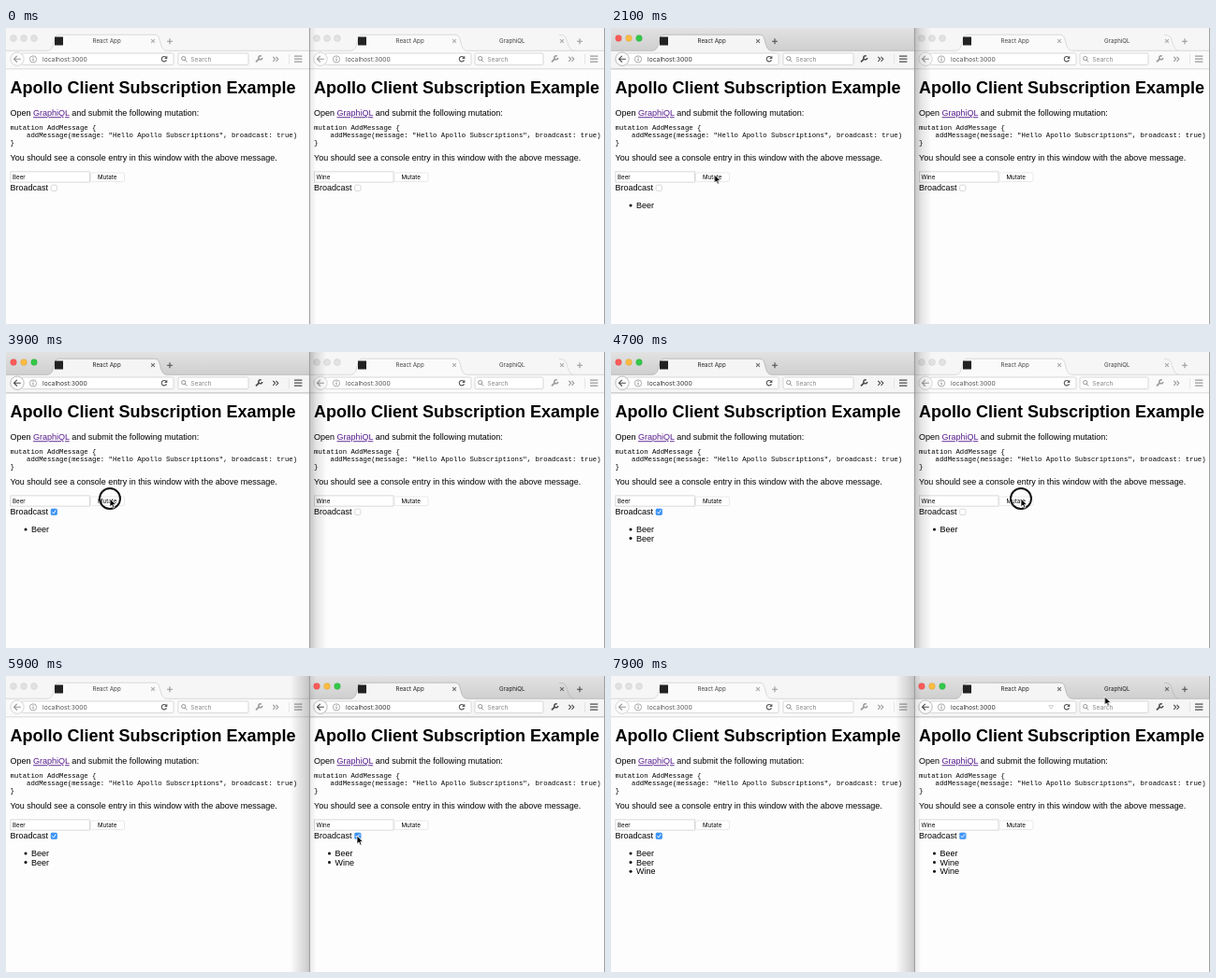
Write an HTML page that moves like this. It is 640 px wide and 317 px high and loops after 8000 ms.

```html
<!DOCTYPE html>
<html lang="en">
<head>
<meta charset="utf-8">
<title>Subscription demo</title>
<style>
  html, body { margin: 0; width: 100%; height: 100%; overflow: hidden; background: #fdfdfd; }
  svg { display: block; width: 100vw; height: 100vh; }
  text { font-family: "Liberation Sans", Arial, sans-serif; font-size: 9px; fill: #000; }
  .h1 { font-size: 18px; font-weight: bold; }
  .code { font-family: "Liberation Mono", "Courier New", monospace; font-size: 7.3125px; }
  .ui { font-family: Inter, sans-serif; font-size: 6.19px; }
  .url { font-family: Inter, sans-serif; font-size: 6.75px; fill: var(--text); }
  .hint { fill: #888; }
  .link { fill: #551a8b; text-decoration: underline; }
  .idle { --strip: #f6f6f6; --bar: #fafafa; --edge: #d2d2d2; --icon: #999; --text: #555; --title: #444; --red: #e2e2e2; --amber: #e2e2e2; --green: #e2e2e2; --ring: #d0d0d0; }
  .live { --strip: url(#strip); --bar: #f5f5f5; --edge: #b4b4b4; --icon: #4c4c4c; --text: #333; --title: #222; --red: #fc5b57; --amber: #fdbc40; --green: #34c84a; --ring: #0002; }
  .tab { fill: var(--title); }
  .line { fill: none; stroke: var(--icon); stroke-width: 1.1; }
  .field { fill: #fff; stroke: #cfcfcf; stroke-width: .8; }

  .step { animation: 8s step-end infinite; }
  @keyframes leftFocus { 0%, 60%, 100% { opacity: 0 } 20% { opacity: 1 } }
  @keyframes rightFocus { 0% { opacity: 0 } 60%, 100% { opacity: 1 } }
  @keyframes beer { 0% { opacity: 0 } 23.75%, 100% { opacity: 1 } }
  @keyframes leftCheck { 0% { opacity: 0 } 40%, 100% { opacity: 1 } }
  @keyframes sharedBeer { 0% { opacity: 0 } 51.25%, 100% { opacity: 1 } }
  @keyframes wine { 0% { opacity: 0 } 63.75%, 100% { opacity: 1 } }
  @keyframes rightCheck { 0% { opacity: 0 } 72.5%, 100% { opacity: 1 } }
  @keyframes sharedWine { 0% { opacity: 0 } 81.25%, 100% { opacity: 1 } }
  @keyframes urlHover { 0% { opacity: 0 } 95%, 100% { opacity: 1 } }
  @keyframes pointer { 0% { opacity: 0 } 3.75%, 100% { opacity: 1 } }
  @keyframes press {
    0%, 21.25%, 40.6%, 49.4%, 60.6%, 73.75%, 81.25%, 100% { opacity: 0 }
    17.5%, 37.5%, 46.9%, 57.5%, 71.25%, 78.75% { opacity: 1 }
  }
  #mouse { animation: travel 8s ease-in-out infinite; }
  @keyframes travel {
    0%, 3.75% { transform: translate(200px, 241px) }
    15%, 28% { transform: translate(110.5px, 157px) }
    36%, 41% { transform: translate(50px, 171px) }
    46%, 50.5% { transform: translate(111px, 157px) }
    57%, 65.5% { transform: translate(438px, 157px) }
    71%, 74% { transform: translate(375px, 171px) }
    78%, 90% { transform: translate(432.5px, 157px) }
    98.5%, 100% { transform: translate(527.5px, 22px) }
  }
</style>
</head>
<body>
<svg id="stage" viewBox="0 0 640 317" xmlns="http://www.w3.org/2000/svg"></svg>
<script>
const step = (name, body) => `<g class="step" style="animation-name:${name}">${body}</g>`;
const text = (x, y, body, cls = '') => `<text x="${x}" y="${y}" class="${cls}">${body}</text>`;
const line = (d, extra = '') => `<path class="line" d="${d}" ${extra}/>`;
const field = (x, y, w, h, r = 1.5) =>
  `<rect class="field" x="${x}" y="${y}" width="${w}" height="${h}" rx="${r}"/>`;
const closeMark = x => line(`M${x - 1.9} 12.1l3.8 3.8m0-3.8l-3.8 3.8`, 'opacity=".8"');

const light = (x, color) =>
  `<circle cx="${x}" cy="11" r="3.4" fill="var(--${color})" stroke="var(--ring)" stroke-width=".6"/>`;

// Toolbar pieces that move with the window width
const left = { x: 0, w: 324.5, tabEnd: 172, close: 157, plus: 175, reload: 169, urlEnd: 179, search: 184, searchEnd: 259, tools: 0 };
const right = { x: 324, w: 316, tabEnd: 169, close: 155, plus: 289, reload: 163, urlEnd: 173, search: 177, searchEnd: 250, tools: -8 };

function chrome(win, mode) {
  const { w, tabEnd: e, tools, search: s } = win;
  const tab = `M0 24.3H44C49 24 50 20 51.5 14S54 7.2 59 7.2H${e - 15}C${e - 10} 7.2 ${e - 9} 8 ${e - 7.5} 14S${e - 5} 24 ${e} 24.3H${w}`;
  const second = win === right
    ? text(203, 16.3, 'GraphiQL', 'ui tab') + closeMark(270) +
      line('M267 7.4c6 0 7 2 8.5 7s3 9 7 9.8', 'style="stroke:var(--edge);stroke-width:.7"')
    : '';
  const reload = win.reload;
  return `<g class="${mode}">
    <rect width="${w}" height="44" fill="var(--strip)"/>
    <path d="${tab}V44H0Z" fill="var(--bar)"/>
    <path d="${tab}" fill="none" stroke="var(--edge)" stroke-width=".8"/>
    <path d="M0 43.8H${w}" stroke="var(--edge)" stroke-width=".8"/>
    ${light(8, 'red')}${light(19, 'amber')}${light(30, 'green')}
    <rect x="52" y="9.5" width="9" height="9" fill="#222"/>
    ${text(92.5, 16.3, 'React App', 'ui tab')}${closeMark(win.close)}${second}
    ${line(`M${win.plus - 3} 14.2h6m-3-3v6`)}
    ${field(17, 27, win.urlEnd - 17, 12.6)}
    <circle cx="12" cy="33.2" r="7.2" fill="#fcfcfc" stroke="var(--edge)" stroke-width=".9"/>
    ${line('M15.8 33.2H8.6m3.2-3.3l-3.3 3.3 3.3 3.3', 'stroke-width="1.4"')}
    <circle cx="29" cy="33.4" r="3.6" fill="none" stroke="#888" stroke-width=".7"/>
    <path d="M29 32.8v2.5m0-4.2v.9" stroke="#777" stroke-width=".9"/>
    ${text(39, 35.8, 'localhost:3000', 'url')}
    <path d="M${reload + 2.3} 31.8A2.7 2.7 0 1 0 ${reload + 2.5} 34.2" fill="none" stroke="#555" stroke-width="1.1"/>
    <path d="M${reload + 3.3} 29.8v3.2h-3.2z" fill="#555"/>
    ${field(s, 27, win.searchEnd - s, 12.6)}
    <g fill="none" stroke="#888" stroke-width=".9"><circle cx="${s + 5.7}" cy="32.6" r="2.1"/><path d="M${s + 7.2} 34.2l2 2.2"/></g>
    ${text(s + 13.2, 35.8, 'Search', 'url hint')}
    <g transform="translate(${tools})">
      ${line('M267 36.4l3.5-3.6', 'style="stroke-width:1.8"')}
      ${line('M272.8 30.1a2 2 0 1 0 1 1.9', 'style="stroke-width:1.5"')}
      ${line('M285.3 30.8l2.3 2.5-2.3 2.5m3.2-5l2.3 2.5-2.3 2.5')}
      <path d="M302.5 28v11" stroke="#ddd" stroke-width=".7"/>
      ${line('M308 30.2h8.4m-8.4 3h8.4m-8.4 3h8.4', 'style="stroke-width:1.3"')}
    </g>
  </g>`;
}

const item = (row, name, word) => {
  const y = 193 + row * 9.6;
  return step(name, `<circle cx="21" cy="${y - 3}" r="1.5"/>` + text(27, y, word));
};

function page(value, check, items) {
  return text(4.5, 70.3, 'Apollo Client Subscription Example', 'h1') +
    text(4.5, 94.3, 'Open <tspan class="link">GraphiQL</tspan> and submit the following mutation:') +
    text(4.5, 109.3, 'mutation AddMessage {', 'code') +
    text(22.05, 117.3, 'addMessage(message: "Hello Apollo Subscriptions", broadcast: true)', 'code') +
    text(4.5, 125.3, '}', 'code') +
    text(4.5, 142.3, 'You should see a console entry in this window with the above message.') +
    field(4.9, 153.9, 84.6, 11.2, 0) + text(7, 161.8, value, 'ui') +
    `<rect x="90.5" y="155" width="36" height="9.4" rx="1.5" fill="#fff" stroke="#e0e0e0" stroke-width=".7"/>` +
    text(98, 161.8, 'Mutate', 'ui') +
    text(4.5, 173.5, 'Broadcast') +
    field(48.2, 168.2, 6.2, 6.2, 1.3) +
    step(check, `<rect x="47.8" y="167.8" width="7" height="7" rx="1.4" fill="#3d94f6"/>
      <path d="M49.4 171.4l1.4 1.6 2.5-3.6" fill="none" stroke="#fff" stroke-width="1"/>`) +
    items.map(([name, word], row) => item(row, name, word)).join('');
}

function browser(win, focus, body, extra = '') {
  return `<g transform="translate(${win.x})">
    <rect width="${win.w}" height="317" fill="#fdfdfd"/>
    ${chrome(win, 'idle')}${step(focus, chrome(win, 'live'))}${extra}
    <g transform="translate(${win.x ? .5 : 0})">${body}</g></g>`;
}

const dropMarker = step('urlHover', '<path d="M143.8 31.6h4.8l-2.4 3.6z" fill="none" stroke="#bbb" stroke-width=".7"/>');

document.getElementById('stage').innerHTML = `
  <defs>
    <linearGradient id="strip" x2="0" y2="1"><stop stop-color="#e2e2e2"/><stop offset=".55" stop-color="#cfcfcf"/></linearGradient>
    <linearGradient id="toRight"><stop stop-opacity="0"/><stop offset="1" stop-opacity=".2"/></linearGradient>
    <linearGradient id="toLeft"><stop stop-opacity=".16"/><stop offset="1" stop-opacity="0"/></linearGradient>
  </defs>
  ${browser(left, 'leftFocus', page('Beer', 'leftCheck', [['beer', 'Beer'], ['sharedBeer', 'Beer'], ['sharedWine', 'Wine']]))}
  ${browser(right, 'rightFocus', page('Wine', 'rightCheck', [['sharedBeer', 'Beer'], ['wine', 'Wine'], ['sharedWine', 'Wine']]), dropMarker)}
  <rect x="324.5" width="7" height="317" fill="url(#toLeft)" opacity=".5"/>
  ${step('leftFocus', '<rect x="324.5" width="18" height="317" fill="url(#toLeft)"/>')}
  ${step('rightFocus', '<rect x="304" width="20" height="317" fill="url(#toRight)"/>')}
  <path d="M324.4 0V317" stroke="#999" stroke-width="1"/>
  <path d="M639.5 0V317" stroke="#a0a0a0" stroke-width="1"/>
  <g id="mouse">
    ${step('press', '<circle r="11" fill="none" stroke="#111" stroke-width="1.9"/>')}
    ${step('pointer', '<path d="M0 0V8.9L2.1 7 3.5 10.2 5.1 9.5 3.7 6.4H6.5Z" fill="#000" stroke="#fff" stroke-width=".8"/>')}
  </g>`;
</script>
</body>
</html>
```
